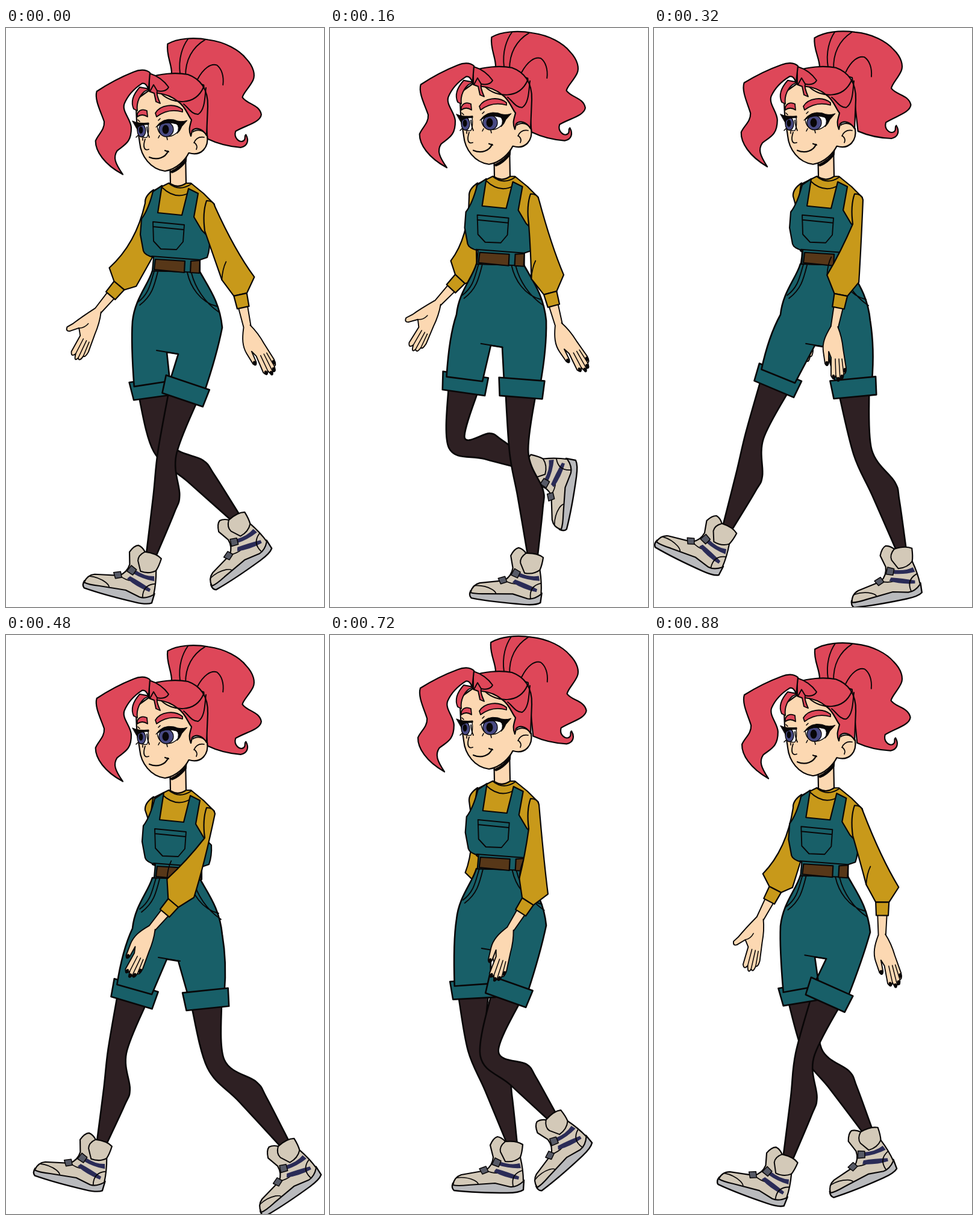
Animation of 528 by 959 pixels, one loop 960 ms. Source, as an HTML page with a canvas:

```html
<!DOCTYPE html>
<html lang="en">
<head>
<meta charset="utf-8">
<title>Walk cycle</title>
<style>
html, body { margin: 0; width: 100%; height: 100%; overflow: hidden; background: #fff; }
canvas { display: block; width: 528px; height: 959px; }
</style>
</head>
<body>
<canvas id="stage" width="528" height="959"></canvas>
<script>
const ctx = document.getElementById('stage').getContext('2d');
const STEP = 80, COUNT = 12;
const INK = '#080607', HAIR = '#de4759', SKIN = '#fcd8b2', TEAL = '#185f68', GOLD = '#c8991a',
  TIGHTS = '#2e2023', BELT = '#573718', CREAM = '#d3c9b8', SOLE = '#b9babd', NAVY = '#2a2b57', STEEL = '#575a66';

// Cosine of the gait phase: one turn is two strides of six steps
const wave = (k, lag = 0) => Math.cos((k * 30 - lag) * Math.PI / 180);
const bob = k => -7.5 * (1 - wave(2 * k));
const swing = k => wave(k, 8);
const thighTilt = k => 5 + 16 * wave(k, -40) + 2 * wave(2 * k, -135);
const forearmTilt = k => 14 - 32 * wave(k, 35);

// Ankle path: step, x, y, foot angle at contact, flat, push-off, lift, pass, reach
const ankleKeys = [
  [0, 241, 872, 13], [3, 384, 873, 0], [6, 462, 842, -36],
  [8, 410, 756, -82], [9, 368, 797, -43], [10, 204, 859, 24]
];
function anklePath(k) {
  k %= COUNT;
  const i = ankleKeys.findLastIndex(key => key[0] <= k);
  const a = ankleKeys[i], b = ankleKeys[(i + 1) % ankleKeys.length];
  const f = (k - a[0]) / ((b[0] || COUNT) - a[0]);
  return a.slice(1).map((v, j) => v + (b[j + 1] - v) * f);
}

function shape(d, fill, width = 2.2, ink = INK) {
  const path = new Path2D(d);
  if (fill) { ctx.fillStyle = fill; ctx.fill(path); }
  if (width) { ctx.lineWidth = width; ctx.strokeStyle = ink; ctx.stroke(path); }
}
const line = (d, width = 2) => shape(d, null, width);

function oval(x, y, rx, ry, fill, width = 0) {
  shape(`M${x - rx} ${y}a${rx} ${ry} 0 1 1 ${2 * rx} 0a${rx} ${ry} 0 1 1 ${-2 * rx} 0Z`, fill, width);
}
function place(x, y, deg, draw) {
  ctx.save();
  ctx.translate(x, y);
  ctx.rotate(deg * Math.PI / 180);
  draw();
  ctx.restore();
}
const poly = pts => 'M' + pts.map(p => p.join(' ')).join('L') + 'Z';
const unit = (x, y) => { const n = Math.hypot(x, y) || 1; return [x / n, y / n]; };
const offset = (x, y, [nx, ny], w) => [x + nx * w, y + ny * w];

// Point at dx, dy in a frame turned by deg around x, y
function turn([x, y, deg], dx, dy) {
  const r = deg * Math.PI / 180, c = Math.cos(r), s = Math.sin(r);
  return [x + dx * c - dy * s, y + dx * s + dy * c];
}

// Smooth line through points
function curve(p) {
  let d = p[0].join(' ');
  for (let i = 0; i < p.length - 1; i++) {
    const a = p[i - 1] || p[i], b = p[i], c = p[i + 1], e = p[i + 2] || c;
    d += `C${b[0] + (c[0] - a[0]) / 6} ${b[1] + (c[1] - a[1]) / 6} ` +
      `${c[0] - (e[0] - b[0]) / 6} ${c[1] - (e[1] - b[1]) / 6} ${c[0]} ${c[1]}`;
  }
  return d;
}

function legPose(k, near) {
  const phase = near ? k : k + 6, tilt = thighTilt(phase);
  const hip = [near ? 320 : 233, 521 + bob(k) * .7, tilt], thigh = near ? 191 : 175;
  const [x, y, foot] = anklePath(phase);
  return {
    cuff: [...turn(hip, 0, thigh * .44), near ? tilt + 2 : tilt],
    knee: turn(hip, 0, thigh),
    ankle: near ? [x, y] : [x - 82, y - 32],
    foot
  };
}

function shoe() {
  shape('M-98 67Q-101 75-96 79Q-60 83-8 83Q12 83 19 78L20 62Z', SOLE, 2.4);
  shape('M-98 70Q-96 57-84 53L-44 46Q-32 38-31 24L-36 4Q-31-8-24-10Q-17-9-11-2Q8-4 18 3Q17 16 14 24Q19 45 19 64Q8 74-3 73L-28 67-72 70Q-90 72-98 70Z', CREAM);
  line('M-11-2Q-21 6-19 15L-11 31Q4 33 14 24');
  line('M-92 58Q-76 56-63 62Q-57 65-56 68M-43 46Q-32 51-22 50', 1.7);
  shape('M-20 31Q-2 38 13 34L15 42Q-4 43-23 37Z', NAVY, 0);
  shape('M-26 43Q-8 48 12 56L11 61Q-12 58-30 48Z', NAVY, 0);
  line('M2 72Q-2 52 17 46', 1.8);
  shape('M-28 25L-18 30-22 40-33 36Z', STEEL, 1.5);
  shape('M-54 43L-43 39-39 48-49 52Z', STEEL, 1.5);
}

function leg({ cuff: top, knee: [kx, ky], ankle: [ax, ay], foot }) {
  const t = unit(kx - top[0], ky - top[1]), s = unit(ax - kx, ay - ky);
  const back = [s[1], -s[0]], bend = unit(t[1] + s[1], -t[0] - s[0]);
  const shin = (f, w) => offset(kx + (ax - kx) * f, ky + (ay - ky) * f, back, w);
  const front = [turn(top, -26, 4), offset(kx, ky, bend, -16), shin(.42, -12), shin(1.02, -8)];
  const rear = [shin(1.02, 8), shin(.56, 27), shin(.38, 31), offset(kx, ky, bend, 15), turn(top, 25, 4)];
  shape('M' + curve(front) + 'L' + curve(rear) + 'Z', TIGHTS, 2.6);
  place(ax, ay, foot, shoe);
}

function cuff([x, y, deg]) {
  place(x, y, deg, () => shape('M-38-16L38-15 36 15-35 14Z', TEAL, 2.6));
}

function hand(near) {
  const thumb = near ? 'C-15 12-20 24-18 38L-15 58Q-11 65-9 57L-9 38' : 'C-14 12-20 24-25 36L-31 46Q-30 54-24 50L-13 38';
  shape('M-6-3' + thumb + 'L-5 48-5 78Q-1 87 3 78Q7 92 10 82Q15 87 16 75Q20 76 20 65L15 34Q13 14 6-3', SKIN, 1.9);
  line('M3 78L2 50M10 82L8 50M16 75L13 50', 1.5);
  if (!near) return line('M-13 38Q-5 34-3 24', 1.5);
  [[-12, 58], [-1, 80], [7, 84], [13, 80], [18, 69]].forEach(([x, y]) => oval(x, y, 2.6, 4, INK));
}

function arm(k, near) {
  const b = bob(k), s = swing(k), tilt = forearmTilt(near ? k : k + 6);
  const x = near ? 331 + 61 * s : 246 - 53 * s - 13 * s * s;
  const y = b + (near ? 466 - 14 * s * s : 435);
  const wrist = [x, y, tilt], puff = [x, y, tilt * .75], rise = near ? 0 : 12;
  const [hx, hy] = turn(wrist, 0, 46);
  const [lx, ly] = turn(puff, -27, rise - 40), [rx, ry] = turn(puff, 27, rise - 36);
  const bottom = [turn(wrist, 11, -11), turn(wrist, -11, -11)];

  shape(poly([turn(wrist, -8, 4), turn(wrist, 8, 4), turn(wrist, 6, 46), turn(wrist, -6, 46)]), SKIN, 1.9);
  place(hx, hy, tilt - 11, () => hand(near));
  const hem = `${rx} ${ry}L${bottom.join('L')}L${lx} ${ly}`;
  shape(near
    ? `M333 ${286 + b}Q345 ${286 + b} 347 ${296 + b}Q${(347 + rx) / 2} ${(296 + b + ry) / 2 + 14} ${hem}` +
      `Q${(lx + 329) / 2 + 2} ${(ly + 336 + b) / 2 + 4} 330 ${336 + b}Q326 ${306 + b} 333 ${286 + b}Z`
    : `M245 ${268 + b}L243 ${380 + b}L${hem}Q${(lx + 232) / 2 + 14} ${(ly + 288 + b) / 2 + 15} 231 ${290 + b}Q230 ${278 + b} 245 ${268 + b}Z`, GOLD);
  shape(poly([...bottom, turn(wrist, -10, 11), turn(wrist, 10, 11)]), GOLD);
  if (near) line(`M${lx} ${ly}q1-18 7-30`, 1.8);
}

function shorts(far, near, b) {
  const [fx, fy] = turn(far, -31, -8), [nx, ny] = turn(near, 31, -8);
  shape(`M243 ${402 + b}C236 ${426 + b} 214 ${448 + b} 210 ${486 + b}Q${(210 + fx) / 2 - 4} ${522 + b} ${fx} ${fy}` +
    `L${turn(far, 29, -8).join(' ')}L267 ${537 + b}L286 ${540 + b}L${turn(near, -29, -8).join(' ')}L${nx} ${ny}` +
    `Q${(359 + nx) / 2 + 6} ${542 + b} 359 ${496 + b}C355 ${455 + b} 338 ${432 + b} 322 ${404 + b}Z`, TEAL, 2.6);
}

function shirt() {
  shape('M270 257L244 270 240 300 240 330 332 346 346 292 328 274 307 257Z', GOLD);
  shape('M272 205L273 258Q286 266 299 257L298 205Z', SKIN);
  shape('M272 238Q290 230 300 214L299 222Q288 236 276 240Z', INK, 1);
  line('M270 257Q288 272 308 258M259 264Q282 286 306 272');
}

function overalls() {
  shape('M244 271L259 261 252 306 292 310 303 266 319 274 312 313 325 335 338 348Q339 366 334 380L322 384 322 405 243 402 245 380Q230 376 228 369L223 342 225 316Q236 302 244 271Z', TEAL);
  line('M242 378L322 384M250 534L286 540');
  shape('M248 383L297 386 296 405 246 400Z', BELT);
  shape('M307 386L322 385 321 406 306 405Z', BELT);
  line('M244 321L296 326 294 354 283 367 257 366 245 353ZM244 329L295 334', 1.9);
  line('M246 403C240 422 238 440 219 454M252 404C246 428 242 444 222 459M301 405C306 428 322 454 350 461M308 406C314 430 330 455 354 471', 1.9);
}

function ponytail() {
  shape('M-25 1C-24-15-34-30-31-49C-15-58 12-60 37-55C65-51 88-37 99-23C112-9 114 5 110 13C104 25 94 33 92 41C100 53 120 53 123 70C121 83 98 87 80 97C76 109 87 117 93 113C98 109 93 106 97 103C102 112 100 122 88 124C65 122 45 115 33 109L28 20Z', HAIR);
  line('M-11 1C-14-25-6-45 3-57M-2 5C-2-22 10-43 31-55M18 10C28-8 40-16 50-13C58-7 62 5 60 20', 1.9);
}

function frontLock() {
  shape('M4-1C-3-7-14-6-23-2C-45 7-65 18-84 31C-88 45-76 66-71 81C-70 95-81 102-85 113C-85 130-70 152-39 168C-52 150-56 140-49 129C-38 119-25 116-26 90C-27 76-42 64-38 51C-32 36-21 25-9 17Q-2 15 2 27Z', HAIR);
}

function eyes() {
  shape('M216 160Q226 156 236 159Q238 174 234 181Q220 184 216 160Z', '#fff', 1.4);
  oval(225, 170, 7, 10.5, '#484a83', 1.3);
  oval(224, 169, 3.5, 6, INK);
  shape('M210 154Q220 159 237 157L237 160Q224 159 217 166Z', INK, 1);
  shape('M251 163Q262 152 290 159Q289 174 274 179Q254 183 251 163Z', '#fff', 1.4);
  oval(266, 168, 12, 12, '#484a83', 1.3);
  oval(265, 168, 5.5, 7.5, INK);
  shape('M249 164Q260 148 279 152Q290 157 301 153L292 163Q289 171 284 175Q289 163 283 159Q265 153 249 164Z', INK, 1);
  line('M219 178L216 181M227 182L227 186M255 178L253 182M267 181L268 185M253 153L256 150M222 155L219 152', 1.6);
}

function head(lag) {
  place(300, 75, lag * .2, ponytail);
  shape('M304 182C307 168 324 164 334 178C337 197 325 213 304 207Z', SKIN);
  line('M312 190Q317 179 329 181M313 190Q319 195 316 201', 1.7);
  shape('M217 118C214 150 220 174 222 190C224 212 240 234 264 237C284 234 298 218 304 206L309 150C300 128 270 105 245 98Z', SKIN);
  shape('M303 176L310 165 309 206 302 206Z', SKIN, 0);
  eyes();
  shape('M218 142Q223 132 234 137L235 147Q226 141 218 147Z', HAIR, 1.8);
  shape('M248 141C256 127 280 124 293 135L293 139C276 134 262 138 250 147Z', HAIR, 1.8);
  line('M231 184C227 196 229 204 237 201M234 164Q235 175 238 181', 1.8);
  line('M238 214C252 220 265 214 269 204M264 203L270 205', 2.2);
  shape('M238 82C255 76 280 73 302 77C322 84 336 101 335 130L333 178C326 166 315 164 309 170L307 179C302 168 306 161 308 152C302 145 298 130 286 122C274 112 262 109 252 108L238 104Z', HAIR);
  line('M258 109C276 126 314 130 328 98M295 126C303 132 308 143 319 143C331 136 330 112 332 99');
  shape('M238 101L222 98C213 108 206 121 212 134L218 137C216 122 223 111 230 105Z', HAIR, 1.9);
  shape('M238 75C254 80 263 88 270 98C267 104 259 106 251 104Q249 109 256 125L249 122 246 108 238 105Z', HAIR, 1.9);
  line('M239 105L245 94 251 104', 1.9);
  place(235, 75, lag * -.18, frontLock);
}

function draw(k) {
  const b = bob(k), far = legPose(k, false), near = legPose(k, true);
  ctx.fillStyle = '#fff';
  ctx.fillRect(0, 0, 528, 959);
  arm(k, false);
  leg(far);
  leg(near);
  cuff(far.cuff);
  place(0, b, 0, shirt);
  shorts(far.cuff, near.cuff, b);
  cuff(near.cuff);
  place(1.5 - 1.5 * swing(k), b, 0, overalls);
  place(0, b, 0, () => head(bob(k - 1)));
  arm(k, true);
}

ctx.lineJoin = ctx.lineCap = 'round';
let shown = -1;
function tick() {
  const k = Math.floor(performance.now() / STEP) % COUNT;
  if (k !== shown) draw(shown = k);
  requestAnimationFrame(tick);
}
tick();
</script>
</body>
</html>
```
